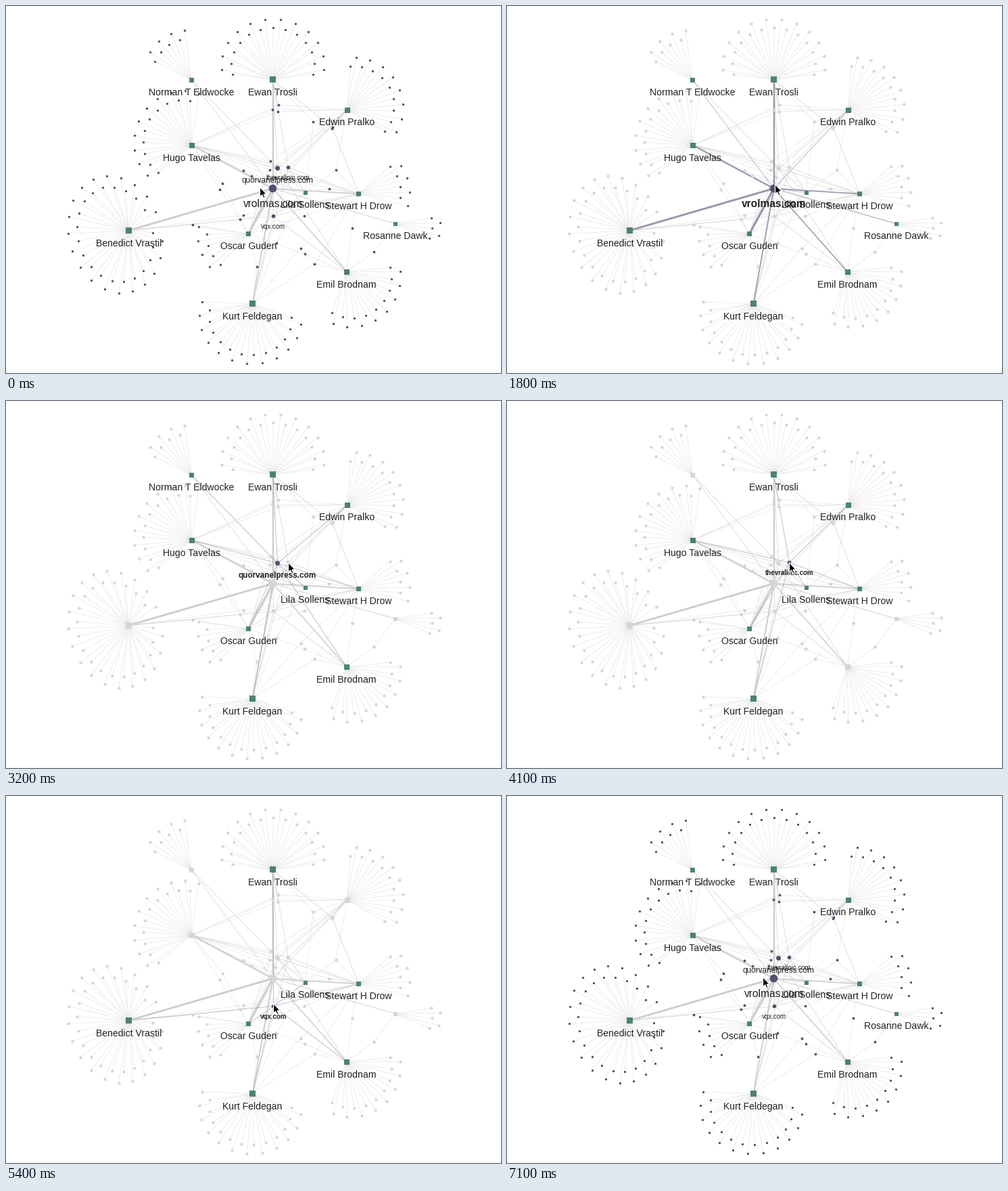
Write a matplotlib script that moves like this. It is 732 by 542 pixels and loops after 7.4 s.

```python
import numpy as np
import matplotlib.pyplot as plt
from matplotlib.animation import FuncAnimation
from matplotlib.collections import LineCollection
from matplotlib.patches import Circle, Polygon, Rectangle

W, H, DPI = 732, 542, 100
FRAMES, INTERVAL = 74, 100
PT = 72 / DPI

PURPLE, GREEN, TEXT = "#524e70", "#4b8370", "#222222"
DIM_NODE, DIM_EDGE, ACTIVE_EDGE = "#d6d6d6", "#cecece", "#9a97ab"
THIN, HAIRLINE = 0.6, 0.36

# key: (label, x, y, leaf count, fan heading in degrees, main link width)
AUTHORS = {
    "norman": ("Norman T Eldwocke", 274, 109, 8, 126, 0.6),
    "ewan": ("Ewan Trosli", 394, 108, 25, 90, 2.4),
    "edwin": ("Edwin Pralko", 504, 153, 17, 28, 0.6),
    "hugo": ("Hugo Tavelas", 274, 205, 20, 152, 2.2),
    "lila": ("Lila Sollens", 442, 275, 0, 0, 0.6),
    "stewart": ("Stewart H Drow", 521, 277, 8, 14, 1.7),
    "benedict": ("Benedict Vrastil", 181, 331, 40, 196, 2.9),
    "rosanne": ("Rosanne Dawk", 575, 321, 5, -7, 0.9),
    "oscar": ("Oscar Guden", 358, 336, 8, 200, 3.2),
    "emil": ("Emil Brodnam", 503, 392, 17, -52, 1.5),
    "kurt": ("Kurt Feldegan", 364, 439, 24, 261, 1.7),
}

# Authors who link to the same minor site, one group per site
SHARED = """
ewan hugo edwin, ewan hugo edwin, ewan hugo edwin, ewan lila edwin,
ewan edwin stewart, ewan edwin stewart, edwin stewart lila,
hugo edwin oscar, hugo edwin oscar, hugo lila, hugo lila, hugo oscar,
hugo oscar, hugo stewart, stewart lila, oscar stewart, oscar emil,
benedict stewart, benedict stewart, stewart emil, rosanne emil,
kurt stewart, kurt lila, kurt emil stewart, kurt oscar, benedict oscar
"""

# key: (label, x, y, radius, font px, authors without a link)
SITES = {
    "main": ("vrolmas.com", 394, 269, 5.8, 15.5, ""),
    "press": ("quorvanelpress.com", 401, 239, 3.5, 11.8, "benedict rosanne"),
    "review": ("thevralinic.com", 417, 238, 2.8, 9.8,
               "norman benedict rosanne emil"),
    "news": ("vqx.com", 395, 310, 2.8, 9.8, "norman edwin hugo rosanne"),
}
LINKS = {key: [a for a in AUTHORS if a not in site[-1].split()]
         for key, site in SITES.items()}

# (start ms, highlighted site)
HOVERS = [(0, None), (1600, "main"), (3000, "press"), (3900, "review"),
          (5400, "news"), (6800, None)]

# Pointer moves: (start ms, end ms, tip at the end)
POINTER_START = (375, 267)
MOVES = [(600, 1100, (394, 268)), (1600, 2700, (403, 241)),
         (3100, 3200, (417, 238)), (4100, 4600, (395, 306)),
         (5500, 5900, (505, 290)), (5900, 6300, (378, 267))]
ARROW = np.array([(0, 0), (0, 14.4), (3.2, 11.4), (5.3, 16.2), (7.7, 15.2),
                  (5.6, 10.5), (10, 10.5)])


def position(author):
    return np.array(AUTHORS[author][1:3])


def fan(author):
    """Leaves on two alternating arcs, wider across the heading when crowded."""
    count, heading = AUTHORS[author][3], np.radians(AUTHORS[author][4])
    along = np.array([np.cos(heading), -np.sin(heading)])
    across = np.array([np.sin(heading), np.cos(heading)])
    reach = min(68, 52 + 2 * count)
    spread = reach + 0.0125 * count ** 2
    centre = position(author) + along * min(21, 0.9 * count)
    for i in range(count):
        angle = np.radians(8.7) * (i - (count - 1) / 2)
        scale = 1 if i % 2 else 0.81
        yield centre + scale * (reach * np.cos(angle) * along
                                + spread * np.sin(angle) * across)


def add_label(text, x, baseline, px):
    return ax.text(x, baseline, text, size=px * PT, color=TEXT, ha="center",
                   va="baseline", family="Liberation Sans", zorder=6)


fig = plt.figure(figsize=(W / DPI, H / DPI), dpi=DPI, facecolor="white")
ax = fig.add_axes([0, 0, 1, 1])
# Whole coordinates are pixel centres
ax.set(xlim=(-0.5, W - 0.5), ylim=(H - 0.5, -0.5))
ax.axis("off")
ax.add_patch(Rectangle((-0.5, 538.5), W, 3, color="#fafafa", lw=0))

rng = np.random.default_rng(4)
leaves, shared, hairlines = [], [], []
for key in AUTHORS:
    for leaf in fan(key):
        leaves.append(leaf)
        hairlines.append((position(key), leaf))
for group in SHARED.split(","):
    hubs = [position(author) for author in group.split()]
    shared.append(np.mean(hubs, axis=0) + rng.uniform(-12, 12, 2))
    hairlines += [(hub, shared[-1]) for hub in hubs]
ax.add_collection(LineCollection(hairlines, colors=DIM_EDGE,
                                 linewidths=HAIRLINE * PT, zorder=1))
leaf_dots = ax.scatter(*np.transpose(leaves), lw=0, zorder=3)
shared_dots = ax.scatter(*np.transpose(shared), lw=0, zorder=3)

site_edges, site_nodes, site_labels = {}, {}, {}
for key, (label, x, y, radius, px, _) in SITES.items():
    widths = [AUTHORS[a][-1] if key == "main" else THIN for a in LINKS[key]]
    site_edges[key] = ax.add_collection(LineCollection(
        [(position(author), (x, y)) for author in LINKS[key]],
        linewidths=np.array(widths) * PT))
    site_nodes[key] = ax.add_patch(Circle((x, y), radius, lw=0))
    site_labels[key] = add_label(label, x, y + 8 + 1.8 * radius + 0.6 * px, px)

squares, author_labels = {}, {}
for key, (label, x, y, count, *_) in AUTHORS.items():
    size = min(9, 6 + count // 8)
    squares[key] = ax.add_patch(Rectangle((x - size / 2, y - size / 2),
                                          size, size, lw=0, zorder=5))
    author_labels[key] = add_label(label, x, y + 19 + size / 2, 14)

ax.add_patch(Rectangle((-0.5, -0.5), W, 19, color="white", lw=0, zorder=8))
pointer = ax.add_patch(Polygon(ARROW, fc="black", ec="white", lw=0.9,
                               joinstyle="miter", zorder=9))


def show_hover(site):
    dimmed = site is not None
    for dots, diameter in ((leaf_dots, 3.3), (shared_dots, 3.8)):
        dots.set_facecolor(DIM_NODE if dimmed else PURPLE)
        dots.set_sizes([((diameter + dimmed) * PT) ** 2])
    for key in SITES:
        active = key == site
        site_edges[key].set_color(ACTIVE_EDGE if active else DIM_EDGE)
        site_edges[key].set_zorder(2.5 if active else 2)
        site_nodes[key].set_facecolor(
            DIM_NODE if dimmed and not active else PURPLE)
        site_nodes[key].set_zorder(4.5 if active else 4)
        site_labels[key].set_visible(active or not dimmed)
        site_labels[key].set_fontweight("bold" if active else "normal")
    for key in AUTHORS:
        lit = not dimmed or key in LINKS[site]
        squares[key].set_facecolor(GREEN if lit else DIM_NODE)
        author_labels[key].set_visible(lit)


def pointer_tip(ms):
    tip = np.array(POINTER_START, float)
    for start, end, goal in MOVES:
        tip += np.clip((ms - start) / (end - start), 0, 1) * (goal - tip)
    return np.round(tip)


def update(frame):
    ms = frame * INTERVAL
    show_hover([site for start, site in HOVERS if start <= ms][-1])
    pointer.set_xy(ARROW + pointer_tip(ms))
    return ()


animation = FuncAnimation(fig, update, frames=FRAMES, interval=INTERVAL,
                          repeat=True, blit=False)
plt.show()
```
